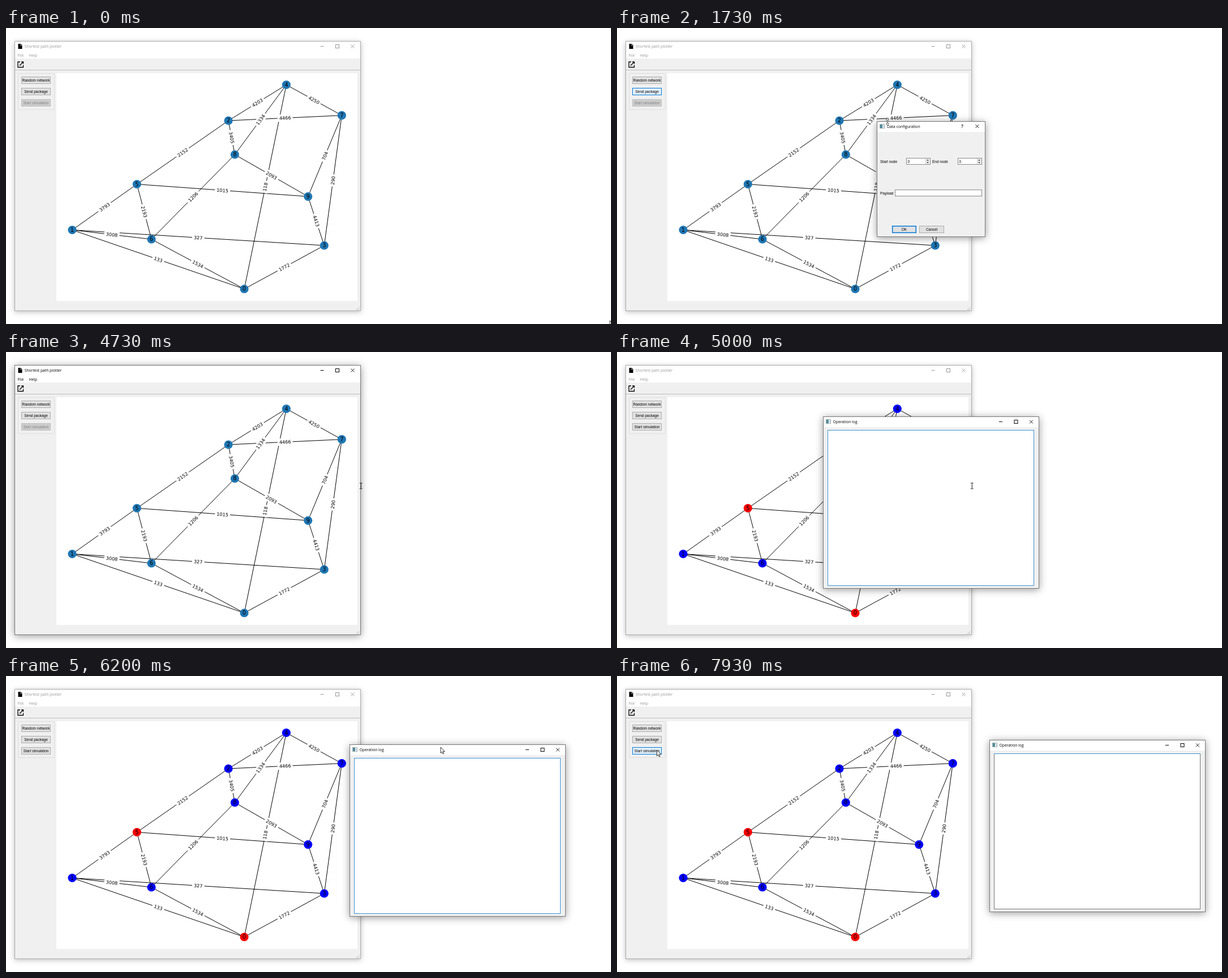
These frames come from a looping animation (1069x524 px, 8000 ms). An HTML page with a canvas:

```html
<!DOCTYPE html>
<html>
<head>
<meta charset="utf-8">
<style>
html, body { margin: 0; width: 100%; height: 100%; overflow: hidden; background: #fff; }
canvas { display: block; }
</style>
</head>
<body>
<canvas id="stage" width="1069" height="524"></canvas>
<script>
const c = document.getElementById('stage').getContext('2d');
const TITLE = '6.75px "Open Sans", sans-serif';
const UI = '6.5px "Liberation Sans", Arial, sans-serif';
const BLUE = '#0078d7';
const LOOP = 8000, STEP = 1000 / 15;

const nodes = [[421, 462], [117, 357.5], [393, 164], [562.3, 385], [495.3, 100.5],
  [231.3, 276.5], [257, 374], [593.3, 154.7], [404.3, 224], [533.7, 298.3]];
// from, to, weight
const edges = [[4, 2, 4203], [4, 7, 4250], [4, 8, 1334], [2, 7, 4466], [4, 0, 118],
  [2, 8, 3405], [2, 5, 2152], [8, 9, 2093], [7, 9, 704], [7, 3, 290],
  [9, 3, 4413], [5, 9, 1015], [8, 6, 1206], [5, 1, 3793], [5, 6, 2193],
  [1, 6, 3008], [1, 3, 327], [1, 0, 133], [6, 0, 1534], [3, 0, 1772]];

// tick, x, y
const pointer = [[0, 1067, 518], [2, 1035, 500], [5, 800, 385], [8, 400, 235], [11, 120, 145],
  [13, 60, 122], [15, 57, 113], [20, 58, 113], [22, 170, 125], [24, 370, 150], [26, 478, 166],
  [27, 482, 168], [30, 550, 210], [33, 620, 235], [35, 627, 237], [75, 627, 237], [77, 600, 205],
  [80, 535, 136], [82, 517, 120], [83, 518, 120], [86, 518, 120], [88, 555, 128], [90, 655, 136],
  [93, 768, 126], [95, 799, 121], [98, 811, 119], [105, 811, 119], [106, 719, 135],
  [109, 440, 138], [113, 175, 137], [116, 90, 133], [118, 71, 131], [120, 70, 131]];
const drag = [[86, 0, 0], [88, 30, 7], [90, 130, 15], [93, 242.5, 7], [95, 277, 1], [98, 293.5, -1.5]];

function at(keys, k) {
  const i = keys.findIndex(p => p[0] > k);
  if (i === 0) return keys[0].slice(1);
  if (i < 0) return keys[keys.length - 1].slice(1);
  const a = keys[i - 1], b = keys[i], u = (k - a[0]) / (b[0] - a[0]);
  return [a[1] + (b[1] - a[1]) * u, a[2] + (b[2] - a[2]) * u];
}

function fill(x, y, w, h, color) {
  c.fillStyle = color;
  c.fillRect(x, y, w, h);
}

function box(x, y, w, h, color, border, width = 1) {
  fill(x, y, w, h, color);
  c.strokeStyle = border;
  c.lineWidth = width;
  c.strokeRect(x + width / 2, y + width / 2, w - width, h - width);
}

function text(s, x, y, font = UI, color = '#000', align = 'left') {
  c.font = font;
  c.fillStyle = color;
  c.textAlign = align;
  c.textBaseline = 'alphabetic';
  c.fillText(s, x, y);
}

function path(points, color, width = 1, closed = false) {
  c.beginPath();
  points.forEach(p => c.lineTo(p[0], p[1]));
  if (closed) c.closePath();
  c.strokeStyle = color;
  c.lineWidth = width;
  c.stroke();
}

function frame(x, y, w, h, active) {
  c.save();
  c.shadowColor = `rgba(0,0,0,${active ? 0.4 : 0.25})`;
  c.shadowBlur = active ? 13 : 9;
  c.shadowOffsetY = 2;
  fill(x, y, w, h, '#f0f0f0');
  c.restore();
  box(x, y, w, h, '#f0f0f0', active ? '#777' : '#aaa');
  fill(x + 1, y + 1, w - 2, 18, '#fff');
}

function closeMark(x, y, color) {
  path([[x - 3, y - 3], [x + 3, y + 3]], color, 0.9);
  path([[x + 3, y - 3], [x - 3, y + 3]], color, 0.9);
}

function captionButtons(right, y, color) {
  path([[right - 71, y], [right - 65, y]], color);
  c.strokeRect(right - 44, y - 3, 6, 6);
  closeMark(right - 14, y, color);
}

function windowIcon(x, y) {
  box(x, y, 9, 8, '#fff', '#8a9aa5', 0.8);
  fill(x + 1, y + 1, 4, 6, '#4f8c96');
  fill(x + 6, y + 2, 2, 4, '#ccd6dc');
}

function button(label, x, y, w, h, state) {
  const [bg, border, ink] = {
    off: ['#ccc', '#bfbfbf', '#838383'],
    hover: ['#e5f1fb', BLUE, '#000']
  }[state] || ['#e1e1e1', '#adadad', '#000'];
  box(x, y, w, h, bg, border);
  text(label, x + w / 2, y + h / 2 + 2.5, UI, ink, 'center');
}

function graph(solved) {
  for (const [a, b] of edges) path([nodes[a], nodes[b]], '#000');
  c.font = '8.2px "DejaVu Sans", sans-serif';
  c.textAlign = 'center';
  c.textBaseline = 'alphabetic';
  for (const [a, b, weight] of edges) {
    const [x1, y1] = nodes[a], [x2, y2] = nodes[b];
    const w = c.measureText(weight).width + 6;
    c.save();
    c.translate((x1 + x2) / 2, (y1 + y2) / 2);
    c.rotate(Math.atan((y2 - y1) / (x2 - x1)));
    c.fillStyle = '#fff';
    c.beginPath();
    c.roundRect(-w / 2, -6.5, w, 13, 2.5);
    c.fill();
    c.fillStyle = '#000';
    c.fillText(weight, 0, 3);
    c.restore();
  }
  nodes.forEach(([x, y], i) => {
    c.fillStyle = !solved ? '#1f77b4' : i === 0 || i === 5 ? '#f00' : '#00f';
    c.beginPath();
    c.arc(x, y, 7.6, 0, 7);
    c.fill();
    text(i, x, y + 3.3, '9.85px "DejaVu Sans", sans-serif', '#000', 'center');
  });
}

function mainWindow(k) {
  const active = k >= 17 && k < 20 || k >= 71 && k < 73;
  const solved = k >= 72;
  const ink = active ? '#000' : '#999';
  frame(15, 23, 612, 478, active);
  fill(16, 42, 610, 12, '#fff');
  fill(16, 74, 610, 1, '#bdbdbd');
  // document icon
  c.fillStyle = '#000';
  c.beginPath();
  [[21.5, 28], [26, 28], [28.5, 30.5], [28.5, 37], [21.5, 37]].forEach(p => c.lineTo(...p));
  c.fill();
  path([[25.7, 28.6], [25.7, 31], [28, 31]], '#fff', 0.6);
  text('Shortest path plotter', 32.7, 35.3, TITLE, ink);
  captionButtons(626.5, 32.5, ink);
  text('File', 20.5, 50.8, TITLE, ink);
  text('Help', 40.5, 50.8, TITLE, ink);
  // open icon
  path([[25, 60], [21, 60], [21, 69.5], [30.5, 69.5], [30.5, 65.5]], '#000', 1.3);
  path([[27, 60], [30.5, 60], [30.5, 63.5]], '#000', 1.3);
  path([[30.3, 60.2], [24, 66.5]], '#000', 1.3);

  box(21, 80, 65, 65, '#f0f0f0', '#dfdfdf');
  button('Random network', 27, 86, 52, 13);
  button('Send package', 27, 106, 52, 13, k >= 14 && k < 27 ? 'hover' : '');
  button('Start simulation', 27, 126, 52, 13, !solved ? 'off' : k >= 117 ? 'hover' : '');
  fill(89, 80, 532, 403, '#fff');
  graph(solved);
  for (let i = 0; i < 3; i++)
    for (let j = 0; j <= i; j++) fill(619 + i * 2, 498 - j * 2, 1, 1, '#aaa');
}

function spin(x, value, border) {
  box(x, 230, 43, 12, '#fff', border);
  fill(x + 34, 231, 8, 10, '#f0f0f0');
  fill(x + 34, 231, 0.7, 10, '#bbb');
  c.fillStyle = '#333';
  for (const s of [-1, 1]) {
    c.beginPath();
    [[-2, 1.2], [2, 1.2], [0, 3.6]].forEach(p => c.lineTo(x + 38 + p[0], 236 + s * p[1]));
    c.fill();
  }
  text(value, x + 2.5, 238.6);
}

function dialog(k) {
  c.globalAlpha = k === 20 || k === 70 ? 0.5 : 1;
  frame(459, 165, 192, 205, true);
  windowIcon(464, 170);
  text('Data configuration', 477, 176.6, TITLE);
  text('?', 610, 177, '600 8px "Open Sans", sans-serif', '#000', 'center');
  closeMark(636.5, 174, '#000');
  text('Start node', 465, 238.8);
  spin(511, '0', '#8a8a8a');
  text('End node', 557, 238.8);
  spin(602, k < 37 ? '0' : '5', k < 33 ? '#8a8a8a' : '#333');
  if (k >= 35 && k < 43) fill(608, 232, 0.8, 8, '#000');
  text('Payload', 465, 294.8);
  const focus = k >= 51;
  box(491, 286, 154, 12, '#fff', focus ? BLUE : '#8a8a8a');
  if (focus) {
    const n = [56, 57, 60, 62, 64, 65].filter(tick => k >= tick).length;
    const typed = '123456'.slice(0, n);
    text(typed, 493.7, 294.7);
    fill(494 + c.measureText(typed).width, 288, 0.8, 8, '#000');
  }
  button('OK', 486, 350, 43, 13);
  c.strokeStyle = BLUE;
  c.lineWidth = 1.5;
  c.strokeRect(486.7, 350.7, 41.6, 11.6);
  button('Cancel', 534, 350, 44, 13);
  c.globalAlpha = 1;
}

function logWindow(k) {
  const [dx, dy] = at(drag, k);
  c.save();
  c.translate(Math.round(364 + dx), Math.round(114 + dy));
  c.globalAlpha = k === 73 ? 0.5 : 1;
  frame(0, 0, 382, 305, true);
  windowIcon(5, 5);
  text('Operation log', 17.5, 11.7, TITLE);
  captionButtons(382, 9.5, '#000');
  box(8, 24, 365, 276, '#fff', k < 98 ? '#3a93d6' : '#777');
  fill(8, 24, 365, 1, '#3a93d6');
  c.restore();
}

function arrow() {
  const shape = [[0, 0], [0, 10.5], [2.4, 8.3], [4, 12], [5.6, 11.3], [4, 7.7], [7.2, 7.5]];
  c.beginPath();
  shape.forEach(p => c.lineTo(...p));
  c.closePath();
  c.fillStyle = '#fff';
  c.fill();
  path(shape, '#000', 0.8, true);
}

function beam() {
  path([[0.3, -5], [0.3, 5]], '#222');
  for (const y of [-5, 5]) path([[-2.3, y], [2.8, y]], '#222', 0.9);
}

function resizer() {
  const half = [[0, -6.5], [2.6, -3.4], [0.8, -3.4]];
  const right = half.concat(half.slice().reverse().map(([x, y]) => [x, -y]));
  const shape = right.concat(right.slice().reverse().map(([x, y]) => [-x, y]));
  c.beginPath();
  shape.forEach(p => c.lineTo(...p));
  c.fillStyle = '#fff';
  c.fill();
  path(shape, '#333', 0.7, true);
}

function cursor(k) {
  c.save();
  c.translate(...at(pointer, k));
  if (k === 26) resizer();
  else if (k >= 33 && k < 80) beam();
  else arrow();
  c.restore();
}

function draw(now) {
  const k = Math.floor((now % LOOP + 3.4) / STEP) % 120;
  fill(0, 0, 1069, 524, '#fff');
  mainWindow(k);
  if (k >= 20 && k <= 70) dialog(k);
  if (k >= 73) logWindow(k);
  cursor(k);
}

const start = performance.now();
function tick() {
  draw(performance.now() - start);
  requestAnimationFrame(tick);
}
tick();
</script>
</body>
</html>
```
